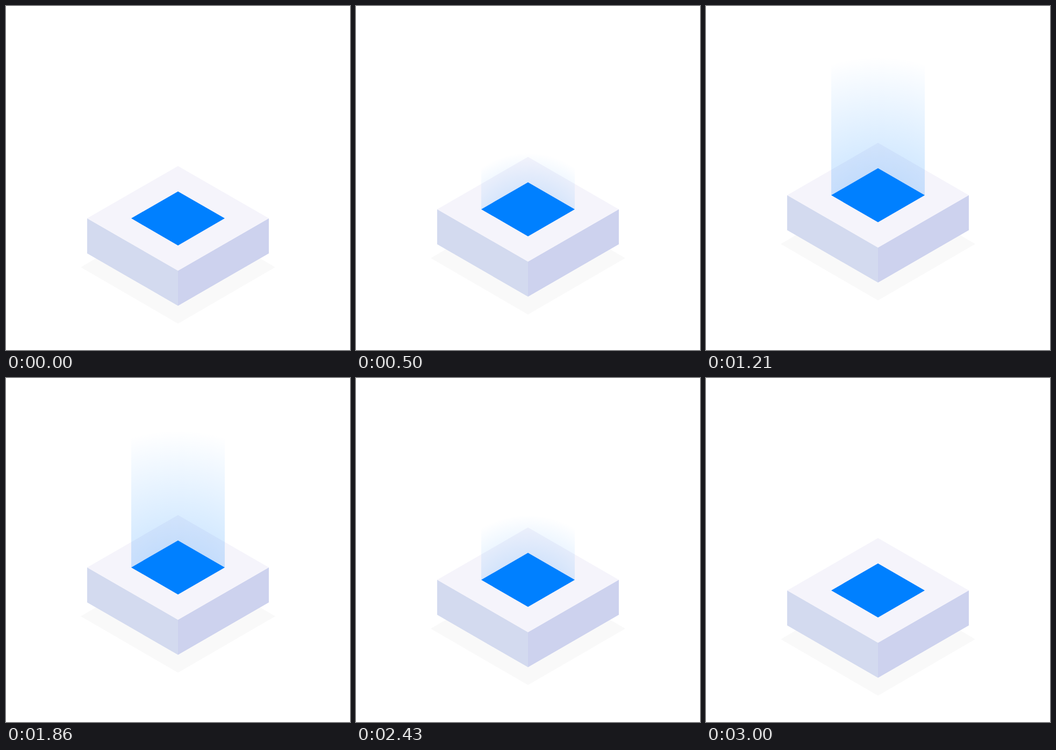
Animation of 640x640 px, one loop 3430 ms. Source, as an HTML page:

```html
<!DOCTYPE html>
<html lang="en">
<head>
<meta charset="utf-8">
<title>Light beam</title>
<style>
  html, body { margin: 0; width: 100%; height: 100%; overflow: hidden; background: #fff; }
  svg { display: block; width: 100%; height: 100%; }
</style>
</head>
<body>
<svg viewBox="0 0 640 640">
  <defs>
    <radialGradient id="glow" gradientUnits="userSpaceOnUse" cx="320" cy="445.5" r="54">
      <stop offset="0" stop-color="#0080ff" stop-opacity=".28"/>
      <stop offset="1" stop-color="#0080ff" stop-opacity="0"/>
    </radialGradient>
  </defs>
  <g id="block">
    <path fill="#f9f9f9" d="M139 486 320 381 501 486 320 591Z"/>
    <path fill="#d3daef" d="M151 395 320 492.4V557.8L151 460.3Z"/>
    <path fill="#cdd2ee" d="M489 395 320 492.4V557.8L489 460.3Z"/>
    <path fill="#f5f4fb" d="M320 297.8 489 395.2 320 492.6 151 395.2Z"/>
    <path fill="url(#glow)" d="M233 395.2V60H407V395.2L320 445.5Z"/>
    <path fill="#0080ff" d="M320 345 407 395.2 320 445.5 233 395.2Z"/>
  </g>
</svg>
<script>
  const LOOP = 3430, STEP = 1000 / 14, LIFT = 43.2, BEAM = 252;
  const block = document.getElementById('block');
  const glow = document.getElementById('glow');

  function ease(t) {
    t = Math.min(1, Math.max(0, t));
    return t * t * (3 - 2 * t);
  }

  // Motion advances in 14 steps per second: rise, hold, fall, rest.
  function draw(now) {
    const step = Math.floor((now % LOOP + 5) / STEP);
    const rise = ease((step + 0.5) / 17.5) - ease((step - 25) / 17);
    block.setAttribute('transform', `translate(0 ${-LIFT * rise})`);
    glow.setAttribute('r', 56 + BEAM * rise);
  }

  const start = performance.now();
  function tick() {
    draw(performance.now() - start);
    requestAnimationFrame(tick);
  }
  tick();
</script>
</body>
</html>
```
